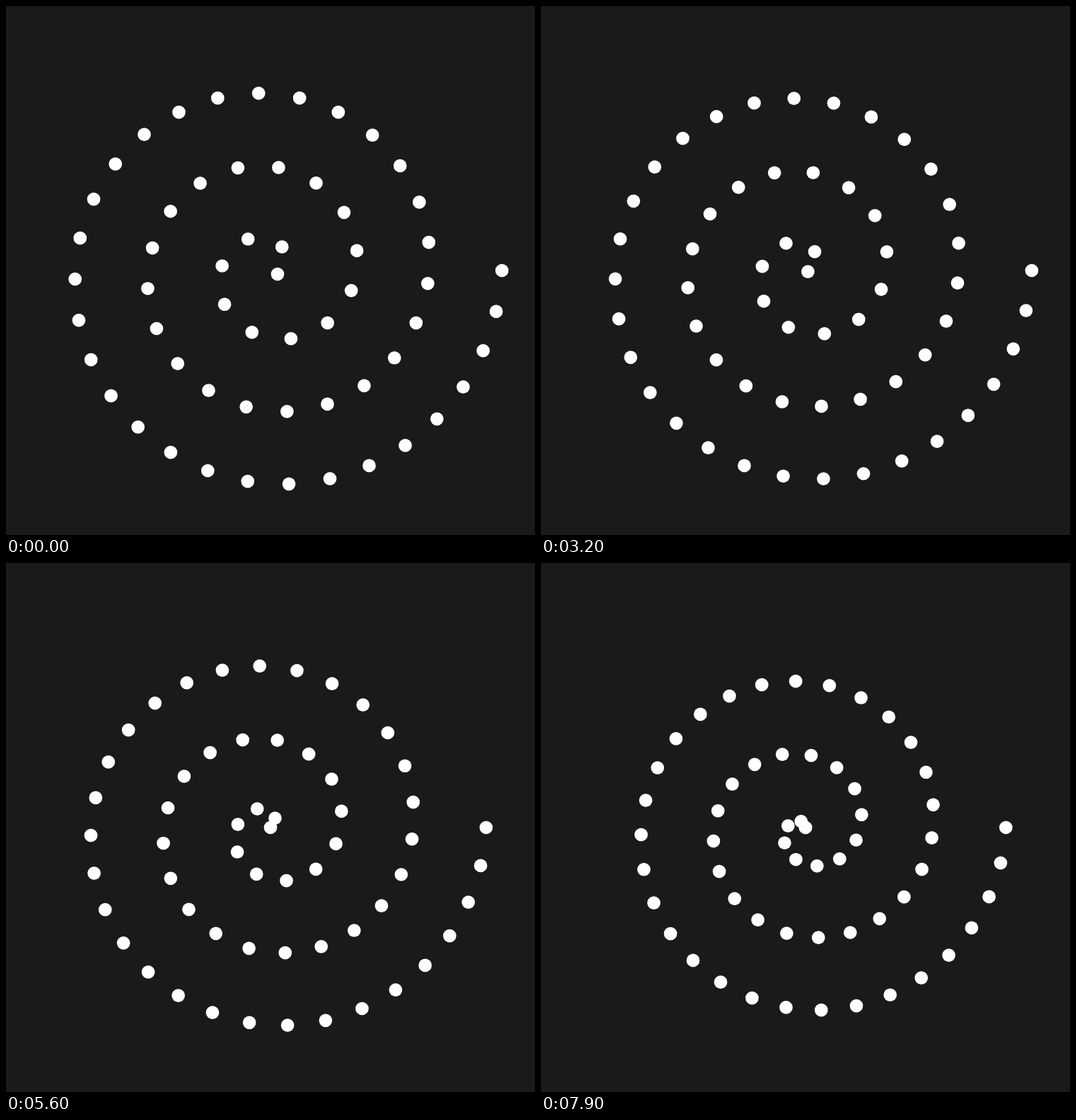
Animation of 748x748 px, one loop 8 s. Source, as an HTML page with a canvas:

```html
<!DOCTYPE html>
<html lang="en">
<head>
<meta charset="utf-8">
<title>Spiral of dots</title>
<style>
html, body { margin: 0; width: 100%; height: 100%; overflow: hidden; background: #1a1a1a; }
canvas { display: block; width: 748px; height: 748px; }
</style>
</head>
<body>
<canvas id="stage" width="748" height="748"></canvas>
<script>
const SIZE = 748;
const MID = SIZE / 2;
const LOOP = 8000;
const STEP = 100;
const DOT = MID / 40;
const TURN = 20;                    // spiral length in radians
const PITCH = MID * 0.875 / TURN;   // radius gained per radian
const GAP = 3.591;                  // spacing between dots, in units of PITCH

const ctx = document.getElementById('stage').getContext('2d');

// Walk inward along the spiral in nearly equal arc steps.
const dots = [];
for (let a = TURN; a > 0; a -= GAP / a) {
  dots.push({ angle: TURN - a, radius: PITCH * a });
}

// Slow cosine swing that pulls every dot toward the middle.
const pull = s => 294.7 * (1 - Math.cos(0.07 * s));

function draw(ms) {
  const shift = pull(ms / 1000);
  ctx.fillStyle = '#1a1a1a';
  ctx.fillRect(0, 0, SIZE, SIZE);
  ctx.fillStyle = '#fff';
  for (const { angle, radius } of dots) {
    const r = Math.max(0, radius - shift);
    ctx.beginPath();
    ctx.arc(MID + r * Math.cos(angle), MID + r * Math.sin(angle), DOT, 0, 2 * Math.PI);
    ctx.fill();
  }
}

const start = performance.now();
function tick() {
  const t = (performance.now() - start) % LOOP;
  draw(Math.floor(t / STEP) * STEP);
  requestAnimationFrame(tick);
}
tick();
</script>
</body>
</html>
```
